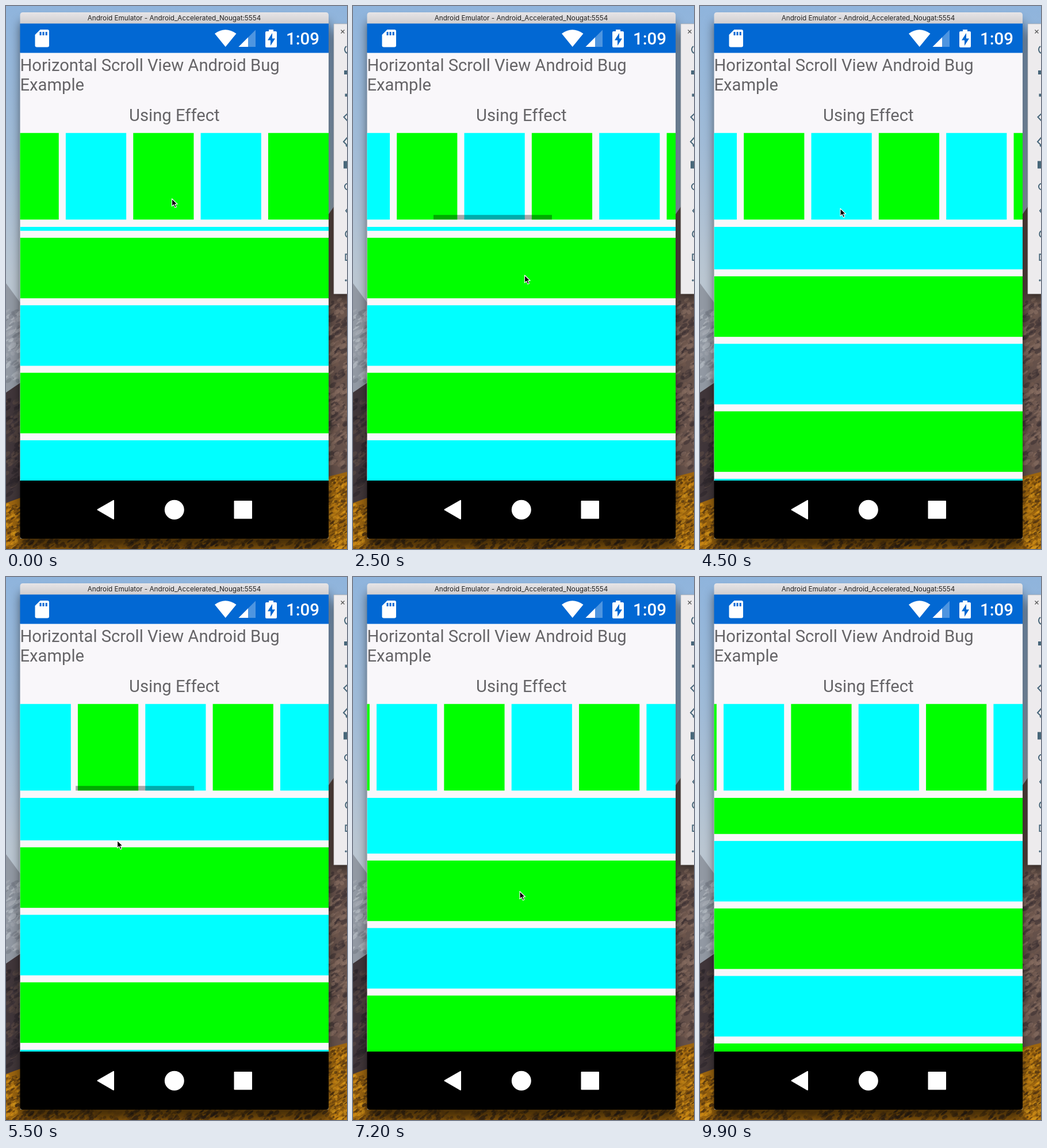
Write an HTML page that moves like this. It is 593 px wide and 944 px high and loops after 10 s.

```html
<!DOCTYPE html>
<html lang="en">
<head>
<meta charset="utf-8">
<title>Nested scroll views</title>
<style>
  html, body { margin: 0; width: 100%; height: 100%; overflow: hidden; background: #8fb2d6; }
  svg { display: block; width: 593px; height: 944px; }
  .label { font: 29.2px Roboto, sans-serif; fill: #656467; }
  .title { font: 11.75px Inter, sans-serif; fill: #222; }
  .clock { font: 500 29.5px Roboto, sans-serif; fill: #fff; }
  .tools { fill: none; stroke: #48677a; stroke-width: 2; }
</style>
</head>
<body>
<svg viewBox="0 0 593 944">
  <defs>
    <linearGradient id="sky" x2="0" y2="1">
      <stop offset="0" stop-color="#8fb4dc"/>
      <stop offset=".25" stop-color="#a0bbd7"/>
      <stop offset=".5" stop-color="#bac6d1"/>
    </linearGradient>
    <linearGradient id="bar" x2="0" y2="1">
      <stop offset="0" stop-color="#e7e5e7"/>
      <stop offset="1" stop-color="#cfcdcf"/>
    </linearGradient>
    <filter id="shadow" x="-20%" y="-20%" width="140%" height="140%"><feGaussianBlur stdDeviation="9"/></filter>
    <clipPath id="rowView"><path d="M24.5 220.5H561V371.6H24.5z"/></clipPath>
    <clipPath id="columnView"><path d="M24.5 384H561V825H24.5z"/></clipPath>
  </defs>

  <path fill="url(#sky)" d="M0 0H593V944H0z"/>
  <path fill="#9299a3" d="M0 482L25 516V680H0z"/>
  <path fill="#40363a" d="M0 672L25 655V870H0z"/>
  <path fill="#65514a" d="M561 362L570 349L593 500V830H561z"/>
  <path fill="#9c650f" d="M0 864L25 855V926H561V818L593 810V944H0z"/>
  <g id="terrain"/>

  <path fill="#000" opacity=".55" filter="url(#shadow)" d="M25 28H561V942H25zM570 44H600V508H570z"/>
  <path fill="url(#bar)" d="M24.5 31V16q0-5 5-5H556q5 0 5 5V31z"/>
  <text class="title" x="292.5" y="25.3" text-anchor="middle">Android Emulator - Android_Accelerated_Nougat:5554</text>
  <path fill="#f9f7fa" d="M24.5 81H561V826H24.5z"/>
  <path fill="#0268d3" d="M24.5 30.5H561V81.5H24.5z"/>

  <g fill="#fff">
    <path d="M59.5 41H72q3 0 3 3V68.5q0 3-3 3H53.5q-3 0-3-3V50z"/>
    <path d="M363 48Q381.5 34.5 400.5 48L381.7 71z"/>
    <path d="M404.5 71H434V41.5z" opacity=".3"/>
    <path d="M404.5 71H421V54.5z"/>
    <path d="M457 41h8v3h4q2 0 2 2V70q0 2-2 2H453q-2 0-2-2V46q0-2 2-2h4z"/>
  </g>
  <path fill="#0268d3" d="M58.5 45h3v6h-3zm5 0h3v6h-3zm5.2 0h3v6h-3zM463 47L455 59.5h5V69l8-12.500h-5z"/>
  <text class="clock" x="487" y="67">1:09</text>

  <text class="label" x="24.5" y="113">Horizontal Scroll View Android Bug</text>
  <text class="label" x="24.5" y="147">Example</text>
  <text class="label" x="292.8" y="199.5" text-anchor="middle">Using Effect</text>

  <g clip-path="url(#rowView)"><g id="row"/><rect id="thumb" y="363.2" width="206" height="8.4" fill-opacity=".33"/></g>
  <g clip-path="url(#columnView)"><g id="column"/></g>

  <path d="M24.5 825H561V921q0 5-5 5H29.5q-5 0-5-5z"/>
  <g fill="#fff" stroke="#fff" stroke-width="2" stroke-linejoin="round">
    <path d="M159.5 875.7L187 859.8V891.6z"/>
    <circle cx="292.8" cy="875.7" r="16"/>
    <path d="M397.5 861H427V890.5H397.5z"/>
  </g>

  <path fill="#edebed" stroke="#aaa" stroke-width=".7" d="M600 31H570V500.5H600z"/>
  <path fill="none" stroke="#555" stroke-width="1.2" d="M582.5 41.5l6 6m0-6l-6 6"/>
  <g class="tools">
    <path d="M592 70a7 7 0 0 0 1 12M594 187L587.5 193L594 200M594 228L587 236L594 243M591 242l3 3"/>
    <circle cx="594.5" cy="314" r="5.5"/>
    <path d="M595 351L591 356L595 361M594 391a6 6 0 0 0 0 11M594 431.5H590.5V442H594"/>
  </g>
  <path fill="#48677a" d="M588 112h6v7h-6zM589.5 152.5h4v5h-4zM587 269.5h7v13h-7z"/>
  <circle cx="591" cy="477" r="1.7" fill="#48677a"/>

  <path id="cursor" stroke="#fff" stroke-width="1.1" stroke-linejoin="round"
    d="M0 0V13.2L3.1 10.4L5.4 15.6L7.8 14.5L5.5 9.5H9.6z"/>
</svg>

<script>
const LOOP = 10000, STEP = 100;
const COUNT = 12, SIZE = 105.2, PITCH = 117.35;
const LEFT = 24.5, TOP = 384, WIDTH = 536.5;
const CONTENT = COUNT * PITCH - (PITCH - SIZE);
const $ = id => document.getElementById(id);
const clamp = v => Math.max(0, Math.min(1, v));
const smooth = p => p * p * (3 - 2 * p);

function add(parent, name, attrs) {
  const el = document.createElementNS('http://www.w3.org/2000/svg', name);
  for (const key in attrs) el.setAttribute(key, attrs[key]);
  parent.append(el);
}

for (let i = 0; i < COUNT; i++) {
  const fill = i % 2 ? '#0f0' : '#0ff';
  add($('row'), 'rect', { x: LEFT + i * PITCH, y: 220.5, width: SIZE, height: 151.1, fill });
  add($('column'), 'rect', { x: LEFT, y: TOP + i * PITCH, width: WIDTH, height: SIZE, fill });
}

// Rough texture for the wallpaper: soft blots strewn over a box.
let seed = 7;
const random = () => (seed = seed * 16807 % 2147483647) / 2147483647;
function scatter(x, y, w, h, size, colors) {
  const count = w * h / size / size;
  for (let i = 0; i < count; i++) {
    const cx = x + random() * w, cy = y + random() * h;
    add($('terrain'), 'ellipse', {
      cx, cy, rx: size * (.4 + random()), ry: size * (.2 + random() * .5),
      transform: `rotate(-35 ${cx} ${cy})`, fill: colors[i % colors.length], opacity: .6
    });
  }
}
const leaves = ['#c98514', '#6b420d', '#dd9c1c', '#452c10'];
scatter(0, 530, 25, 125, 6, ['#b9bfc7', '#777d87', '#a3a8b0']);
scatter(0, 680, 25, 175, 6, ['#2d272c', '#5b4b45', '#43383a']);
scatter(561, 510, 32, 295, 6, ['#8d7366', '#3d3233', '#6f584e']);
scatter(0, 866, 25, 78, 4, leaves);
scatter(561, 820, 32, 124, 4, leaves);
scatter(25, 928, 536, 16, 5, ['#5a3a12', '#33251a', '#8a5912']);

// Each swipe eases the scroll offset by a distance between two times.
const swipe = (start, end, distance) => ({ start, end, distance });
const rowSwipes = [swipe(500, 2300, -89.6), swipe(4600, 6200, -82.2)];
const columnSwipes = [swipe(2600, 3600, -33.3), swipe(3700, 4200, -33.7), swipe(5900, 6400, -66.4),
  swipe(6600, 7200, 43.4), swipe(7700, 9300, -83.3)];

const scrolled = (offset, swipes, t) => swipes.reduce((sum, { start, end, distance }) =>
  sum + distance * smooth(clamp((t - start) / (end - start))), offset);

// The scroll bar lingers for 300 ms, then fades.
const barOpacity = t => Math.max(...rowSwipes.map(({ start, end }) =>
  t <= start ? 0 : clamp(1 - (t - end - 300) / 250)));

const stops = [
  { t: 0, x: 288.5, y: 335 }, { t: 2500, x: 298.5, y: 468 }, { t: 3600, x: 347, y: 581.5 },
  { t: 4500, x: 244, y: 352 }, { t: 6400, x: 150.5, y: 548.5 }, { t: 7200, x: 290, y: 546.5 },
  { t: 9900, x: 420, y: -30 }
];
function pointerAt(t) {
  const i = Math.max(1, stops.findIndex(stop => stop.t >= t));
  const a = stops[i - 1], b = stops[i];
  const p = smooth((t - a.t) / (b.t - a.t));
  return [a.x + (b.x - a.x) * p, a.y + (b.y - a.y) * p];
}

function render(t) {
  const x = scrolled(390, rowSwipes, t), y = scrolled(333.1, columnSwipes, t);
  $('row').setAttribute('transform', `translate(${-x})`);
  $('column').setAttribute('transform', `translate(0 ${-y})`);
  $('thumb').setAttribute('x', LEFT + x * WIDTH / CONTENT);
  $('thumb').setAttribute('opacity', barOpacity(t));
  $('cursor').setAttribute('transform', `translate(${pointerAt(t)})`);
}

function tick(now) {
  render(Math.floor(now % LOOP / STEP) * STEP);
  requestAnimationFrame(tick);
}
render(0);
requestAnimationFrame(tick);
</script>
</body>
</html>
```
